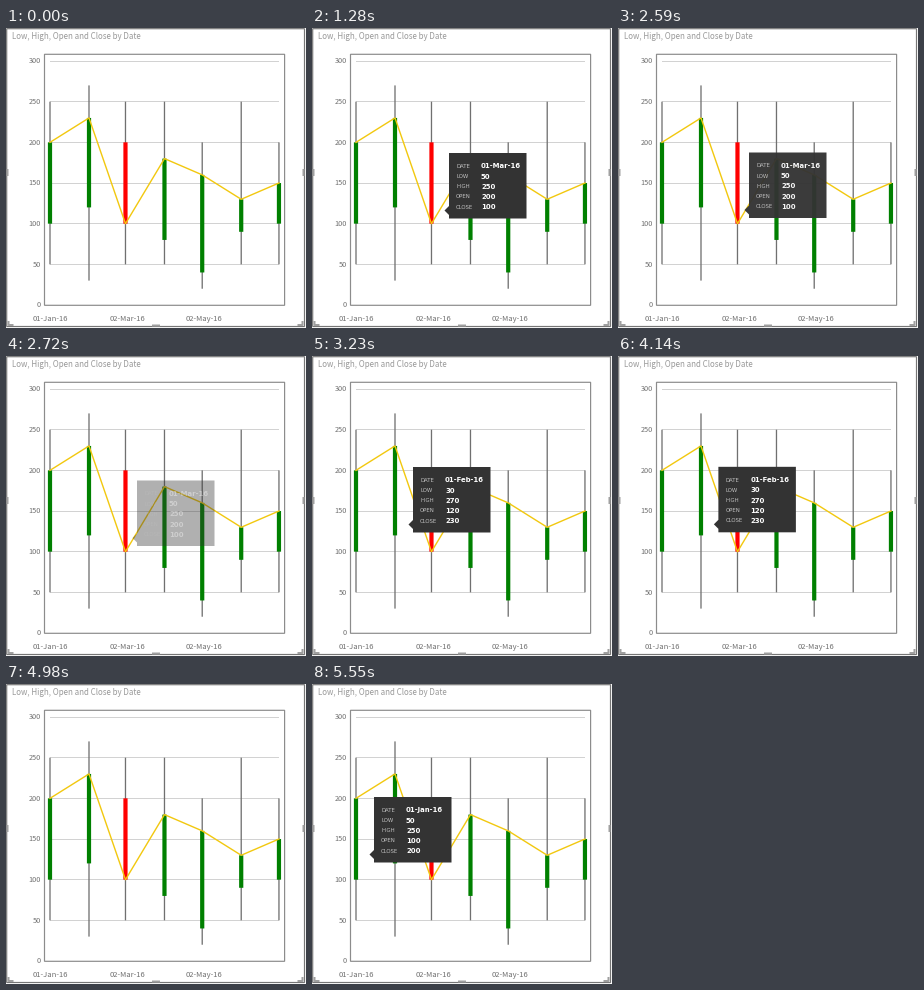
Animation, 300 px wide and 300 px high, one loop 6750 ms. Source, as a matplotlib script:

```python
import matplotlib.pyplot as plt
from matplotlib.animation import FuncAnimation
from matplotlib.collections import LineCollection
from matplotlib.patches import Polygon, Rectangle
from matplotlib.transforms import Affine2D

LOOP, STEP = 6750, 10
FADE_STEP, FADE_STEPS = 42, 5
PX = 0.72  # points per pixel at 100 dpi
SANS = "Noto Sans CJK JP"

MONTHS = "Jan Feb Mar Apr May Jun Jul".split()
SERIES = {
    "LOW": [50, 30, 50, 50, 20, 50, 50],
    "HIGH": [250, 270, 250, 250, 200, 250, 200],
    "OPEN": [100, 120, 200, 80, 40, 90, 100],
    "CLOSE": [200, 230, 100, 180, 160, 130, 150],
}

# one tooltip per visit: month, shown, fading, moving (from, to), place, shift
VISITS = [
    dict(month=2, on=1280, off=2590, move=(1860, 2060), at=(137, 125), by=(-6, -0.5)),
    dict(month=1, on=3230, off=4770, move=(4100, 4230), at=(101, 111), by=(-2, -0.6)),
    dict(month=0, on=5550, off=LOOP, move=(LOOP, LOOP + 1), at=(62, 113), by=(0, 0)),
]

plt.rcParams["path.snap"] = False
fig = plt.figure(figsize=(3, 3), dpi=100, facecolor="white")
ax = fig.add_axes([0, 0, 1, 1])
ax.set(xlim=(0, 300), ylim=(300, 0))
ax.axis("off")


def month_start(i):
    """Day of a leap year on which month i (from 0) begins."""
    return (367 * i + 5) // 12 - (i > 1)


def day_x(day):
    return 44 + day * 1.258


def val_y(value):
    return 277 - value * 0.8133


def label(x, y, text, size, color, ha="left", font=SANS, **kw):
    """Text whose capitals are centred on y."""
    return ax.text(x, y + 0.365 * size, text, fontsize=size * PX, color=color,
                   ha=ha, va="baseline", family=font, **kw)


def lines(segments, color, width, z):
    ax.add_collection(LineCollection(segments, colors=color, linewidths=width * PX,
                                     capstyle="butt", zorder=z), autolim=False)


def box(x0, y0, x1, y1, color, width):
    ax.add_patch(Rectangle((x0, y0), x1 - x0, y1 - y0, fill=False, ec=color,
                           lw=width * PX, joinstyle="miter"))


def draw_border():
    box(0.7, 0.7, 298.5, 298.5, "#767676", 1.2)
    handles = [[(146, 297.5), (154, 297.5)]]
    for x, inward in [(1.5, 1), (297.5, -1)]:
        handles.append([(x, 141), (x, 148)])
        handles.append([(x + inward, 293), (x + inward, 297), (x + 6 * inward, 297)])
    lines(handles, "#a0a0a0", 2, 2)
    label(5.5, 7.6, "Low, High, Open and Close by Date", 7.95, "#999999")


def draw_chart():
    box(38.5, 26.3, 278.6, 277.3, "#8c8c8c", 1.2)
    for v in range(0, 301, 50):
        y = val_y(v)
        label(35, y - 0.2, str(v), 7.3, "#707070", "right")
        if v:
            row = int(y) + 0.5
            lines([[(44, row), (273, row)]], "#d2d2d2", 1, 1)
    for i in range(0, 6, 2):
        day = 61 * i // 2
        name = f"{1 + (i > 0):02d}-{MONTHS[i]}-16"
        label(day_x(day) + 0.4, 290.3, name, 7.6, "#707070", "center")

    xs = [day_x(month_start(i)) for i in range(len(MONTHS))]
    for x, low, high, start, end in zip(xs, *SERIES.values()):
        lines([[(x, val_y(low)), (x, val_y(high))]], "#707070", 1.3, 3)
        color = "#008000" if end > start else "#ff0000"
        lines([[(x, val_y(start)), (x, val_y(end))]], color, 4.2, 4)
    ax.plot(xs, [val_y(v) for v in SERIES["CLOSE"]], color="#f2c80f",
            lw=1.4 * PX, zorder=5)


def make_tip():
    w, h, notch = 77.5, 65.5, 57.5
    shape = [(0, 0), (w, 0), (w, h), (0, h),
             (0, notch + 4.5), (-4.5, notch), (0, notch - 4.5)]
    panel = ax.add_patch(Polygon(shape, fc="#333333", lw=0, zorder=8))
    names, values = [], []
    for i, name in enumerate(["DATE", *SERIES]):
        y = 12.9 + 10.2 * i
        names.append(label(7.2, y, name, 5.4, "#c0c0c0", font="DejaVu Sans", zorder=9))
        values.append(label(32, y, "", 6.85, "white", font="DejaVu Sans",
                            weight="bold", zorder=9))
    return panel, names, values


draw_border()
draw_chart()
panel, names, values = make_tip()
tip = [panel, *names, *values]
shift = Affine2D()
for part in tip:
    part.set_transform(shift + ax.transData)


def opacity(visit, t):
    """Solid while hovered, then fading in even steps."""
    if t < visit["on"]:
        return 0
    if t < visit["off"]:
        return 1
    return max(0, 0.96 * (1 - (t - visit["off"]) // FADE_STEP / FADE_STEPS))


def place(visit, t):
    begin, end = visit["move"]
    p = min(1, max(0, (t - begin) / (end - begin)))
    return [a + p * d for a, d in zip(visit["at"], visit["by"])]


def update(frame):
    t = frame * STEP
    visit = next((v for v in VISITS if opacity(v, t) > 0), None)
    for part in tip:
        part.set_visible(visit is not None)
    if visit:
        shift.clear().translate(*place(visit, t))
        for part in tip:
            part.set_alpha(opacity(visit, t))
        month = visit["month"]
        shown = [f"01-{MONTHS[month]}-16"] + [s[month] for s in SERIES.values()]
        for text, value in zip(values, shown):
            text.set_text(str(value))
    return tip


anim = FuncAnimation(fig, update, frames=LOOP // STEP, interval=STEP,
                     repeat=True, repeat_delay=0, blit=False)
plt.show()
```
